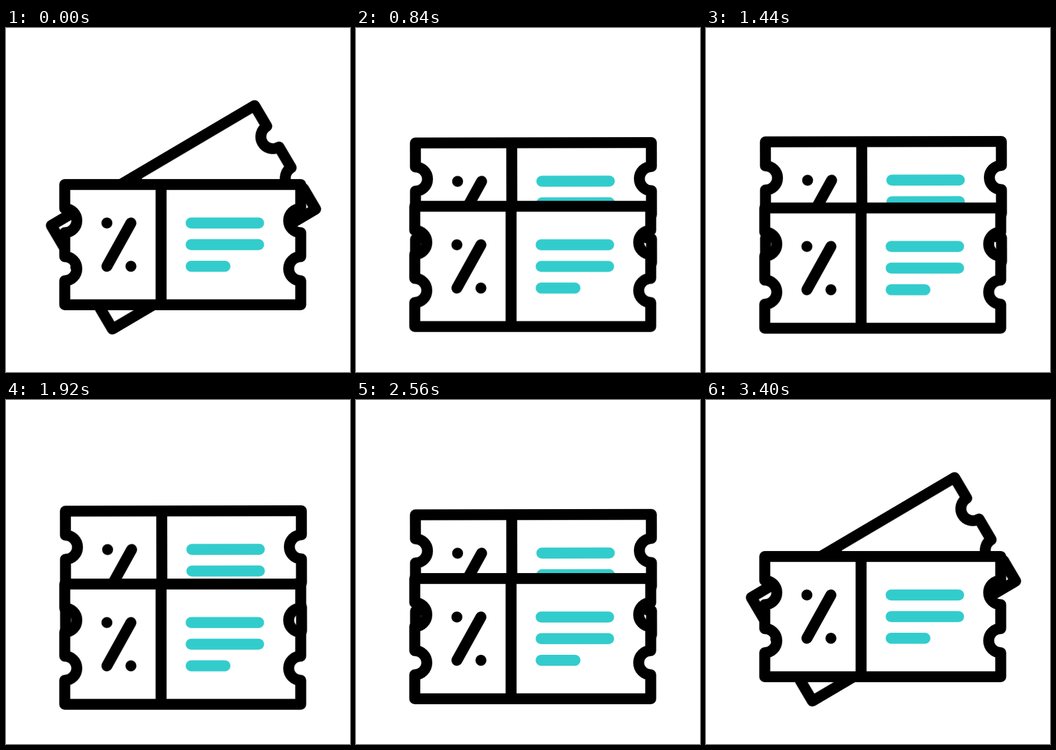
Animation of 640 by 640 pixels, one loop 3.62 s. Source, as an HTML page:

```html
<!DOCTYPE html>
<html lang="en">
<head>
<meta charset="utf-8">
<title>Discount tickets</title>
<style>
  html, body { margin: 0; width: 100%; height: 100%; overflow: hidden; background: #fff; }
  svg { display: block; width: 100%; height: 100%; }
  .body { fill: #fff; stroke: #000; stroke-width: 20.4; stroke-linejoin: round; }
  .marks { fill: none; stroke: #000; stroke-width: 20.4; stroke-linecap: round; }
  .text { stroke: #3cc; }

  /* 3400 ms of motion in six equal parts, then a 220 ms rest */
  .front, .back { animation: 3620ms cubic-bezier(.3333, 0, .6667, 1) infinite; }
  .front { animation-name: front; }
  .back { animation-name: back; }
  .back .marks { animation: fade 3620ms linear infinite; }

  @keyframes front {
    0%, 31.308%, 62.615%, 93.923%, 100% { transform: translate(328.8px, 403px); }
    15.654%, 46.961%, 78.269% { transform: translate(328.8px, 480.4px); }
  }
  @keyframes back {
    0%, 93.923%, 100% { transform: translate(330.2px, 352.2px) rotate(-30.54deg); }
    15.654%, 46.961%, 78.269% { transform: translate(330.2px, 301px) rotate(-.1deg); }
    31.308%, 62.615% { transform: translate(330.2px, 352.2px) rotate(-.1deg); }
  }
  @keyframes fade {
    0%, 93.923%, 100% { opacity: 0; }
    15.654%, 78.269% { opacity: 1; }
  }
</style>
</head>
<body>
<svg viewBox="0 0 640 640">
  <defs>
    <path id="body" d="M-219.5-111.9H219.5v44.8a22.4 22.4 0 0 0 0 44.8v44.6a22.4 22.4 0 0 0 0 44.8v44.8H-219.5v-44.8a22.4 22.4 0 0 0 0-44.8v-44.6a22.4 22.4 0 0 0 0-44.8zM-40.3-111.9V111.9"/>
    <g id="marks">
      <path d="M-141.1-40.3h.01M-96.4 40.3h.01M-96.4-40.3L-141.1 40.3"/>
      <path class="text" d="M15.6-40.3H141.2M15.6 0H141.2M15.6 40.3H78.6"/>
    </g>
  </defs>
  <g class="back">
    <use class="body" href="#body"/>
    <use class="marks" href="#marks"/>
  </g>
  <g class="front">
    <use class="body" href="#body"/>
    <use class="marks" href="#marks"/>
  </g>
</svg>
</body>
</html>
```
